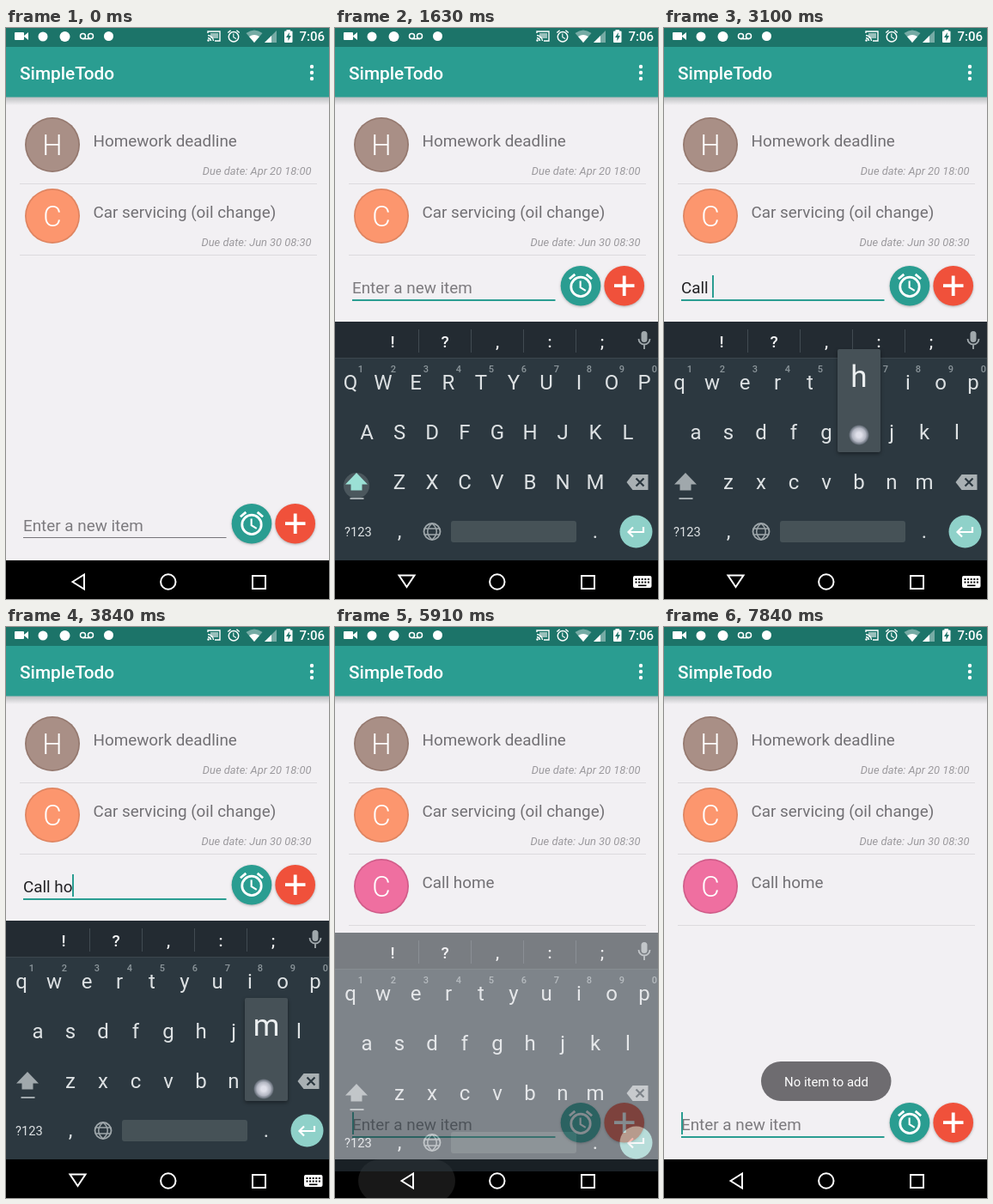
Write an HTML page with a canvas that moves like this. It is 376x665 px and loops after 8000 ms.

```html
<!DOCTYPE html>
<html lang="en">
<head>
<meta charset="utf-8">
<title>Todo list</title>
<style>
html, body { margin: 0; width: 100%; height: 100%; overflow: hidden; background: #f2f0f3 }
canvas { display: block }
</style>
</head>
<body>
<canvas id="stage" width="376" height="665"></canvas>
<script>
const LOOP = 8000, TICK = 147.8;
const TEAL = '#2a9d91', PAPER = '#f2f0f3', KEYS = '#2c3840', ICON = '#a0a8ac';
const screen = document.getElementById('stage').getContext('2d');
const layer = Object.assign(document.createElement('canvas'), { width: 376, height: 665 });
const board = layer.getContext('2d');
let g = screen;

// Timeline, in ticks
const ENTRY = 'Call home', TYPED = [13, 14, 15, 17, 20, 22, 24, 27, 28];
const BLINK = [5, 9, 13, 31, 34, 37, 40, 43, 47, 50, 53];
const FOCUS = 3, OPEN = 5, SHIFT = 11, UNSHIFT = 13, ADDED = 34, CLOSE = 39;
const BOARD_FADE = { 5: [.4, 20], 6: [.85, 6], 39: [.9, 4], 40: [.58, 14] };
const TOAST_FADE = { 48: .15, 49: .5, 50: .85 };
const POPUPS = { 12: 'C', 14: 'a', 15: 'l', 17: 'l', 21: 'h', 24: 'o', 26: 'm', 28: 'e' };
const TOUCHES = {
  2: [130, 578], 3: [130, 578], 10: [25, 534], 12: [151, 538], 14: [37, 474],
  15: [367, 461], 17: [350, 463], 19: [200, 597], 21: [227, 474], 24: [325, 417],
  26: [300, 538], 28: [97, 417], 33: [341, 300], 37: [83, 645], 38: [83, 645], 47: [345, 578]
};
const ROWS = [['qwertyuiop', 18, 421], ['asdfghjkl', 37, 479], ['zxcvbnm', 75, 537]];

function box(x, y, w, h, color, r = 0) {
  g.fillStyle = color;
  g.beginPath();
  g.roundRect(x, y, w, h, r);
  g.fill();
}
function disc(x, y, r, color) {
  g.fillStyle = color;
  g.beginPath();
  g.arc(x, y, r, 0, 7);
  g.fill();
}
function ring(x, y, r, color, width) {
  g.strokeStyle = color;
  g.lineWidth = width;
  g.beginPath();
  g.arc(x, y, r, 0, 7);
  g.stroke();
}
function shape(d, color) {
  g.fillStyle = color;
  g.fill(new Path2D(d));
}
function line(d, color, width) {
  g.strokeStyle = color;
  g.lineWidth = width;
  g.stroke(new Path2D(d));
}
function text(s, x, y, font, color, align = 'left') {
  g.font = font + 'px Roboto, sans-serif';
  g.fillStyle = color;
  g.textAlign = align;
  g.fillText(s, x, y);
}
function shadowed(blur, dy, alpha, draw) {
  g.save();
  g.shadowColor = `rgba(0,0,0,${alpha})`;
  g.shadowBlur = blur;
  g.shadowOffsetY = dy;
  draw();
  g.restore();
}
function alarm(x, y, scale) {
  g.save();
  g.translate(x, y);
  g.scale(scale, scale);
  ring(0, 1, 8, '#fff', 2);
  line('M-9.35-5.5L-4.75-9.35M9.35-5.5L4.75-9.35', '#fff', 2);
  line('M-.25-4V1.6L4.1 4.2', '#fff', 1.5);
  g.restore();
}

function statusBar() {
  box(0, 0, 376, 22, '#1c7469');
  box(10, 5, 11, 9, '#fff', 1);
  shape('M21 9L26 5V14L21 10Z', '#fff');
  disc(43, 10, 5.5, '#fff');
  disc(68.5, 10, 6, '#fff');
  ring(89.5, 9.5, 3, '#fff', 1.5);
  ring(98.5, 9.5, 3, '#fff', 1.5);
  line('M89 12.6H99', '#fff', 1.5);
  disc(119.5, 9.5, 5.5, '#fff');
  line('M235 6V4H249V15H243M235 8.5A7 7 0 0 1 241.5 15M235 11.5A4 4 0 0 1 238.5 15', '#fff', 1.4);
  box(238, 6, 9, 6, 'rgba(255,255,255,.55)');
  disc(235.5, 14.5, 1.2, '#fff');
  alarm(265, 9.5, .72);
  shape('M279.5 6Q289 -1 298.5 6L289 17Z', 'rgba(255,255,255,.4)');
  shape('M283 10Q289 6 295 10L289 17Z', '#fff');
  shape('M315 3V17H301Z', 'rgba(255,255,255,.4)');
  shape('M309 9V17H301Z', '#fff');
  box(324, 3.5, 9.5, 13.5, '#fff', 1);
  box(326.5, 2, 4.5, 2, '#fff');
  shape('M330 5L326 11H328.4V15L332 9H329.5Z', '#1c7469');
  text('7:06', 341.5, 15, '500 15', '#fff');
}

function toolbar() {
  const shade = g.createLinearGradient(0, 80, 0, 90);
  shade.addColorStop(0, '#b9bcbe');
  shade.addColorStop(1, PAPER);
  box(0, 80, 376, 10, shade);
  box(0, 22, 376, 58.6, TEAL);
  text('SimpleTodo', 16, 60, '500 20.8', '#fff');
  for (const y of [45, 52, 59]) disc(356, y, 2.2, '#fff');
}

function item(y, title, due, color, edge) {
  disc(54, y, 32, edge);
  disc(54, y, 30.3, color);
  text(title[0], 54, y + 12, '300 33', '#fff', 'center');
  text(title, 101.5, y + 2, '18.85', '#727074');
  if (due) text('Due date: ' + due, 355.5, y + 35, 'italic 12.9', '#9b999d', 'right');
  box(16, y + 45, 346, 1, '#dcdade');
}

function list(k, raised) {
  g.save();
  g.beginPath();
  g.rect(0, 90, 376, raised ? 187 : 460);
  g.clip();
  item(136, 'Homework deadline', 'Apr 20 18:00', '#a98f86', '#95796f');
  item(219, 'Car servicing (oil change)', 'Jun 30 08:30', '#fc966e', '#df8460');
  if (k >= ADDED) item(302, 'Call home', '', '#ef6fa0', '#d15d8a');
  g.restore();
}

function entry(k, raised) {
  const typed = k < ADDED ? ENTRY.slice(0, TYPED.filter(at => at <= k).length) : '';
  g.save();
  g.translate(0, raised ? -277 : 0);
  text(typed || 'Enter a new item', 20, 586, '18.85', typed ? '#222124' : '#7c7a7e');
  box(20, 593, 236.5, k < FOCUS ? 1 : 2, k < FOCUS ? '#77757a' : TEAL);
  if (BLINK.filter(at => at <= k).length % 2)
    box(Math.floor(20 + (typed && g.measureText(typed).width)), 565, 2, 26, TEAL);
  shadowed(3, 1, .28, () => {
    disc(286, 577.2, 23.3, TEAL);
    disc(336.7, 577.2, 23.3, '#f0513b');
  });
  alarm(286, 577, 1.4);
  line('M325 577.2H348.5M336.7 565.5V589', '#fff', 3.8);
  g.restore();
}

function navBar(k, raised) {
  box(0, 620, 376, 45, '#000');
  if (k >= 38 && k <= 40) box(27, 620, 113, 50, '#181818', 25);
  line(raised ? 'M74.5 637.5H92.5L83.5 651Z' : 'M77.5 645L91 636.5V653.5Z', '#fff', 2);
  ring(188.8, 645, 8.7, '#fff', 2);
  line('M287 638H302V653H287Z', '#fff', 2);
  if (!raised) return;
  box(347, 638, 21.5, 14, '#fff', 2);
  for (let i = 0; i < 5; i++) {
    box(349.5 + i * 3.6, 641, 2, 2, '#000');
    box(349.5 + i * 3.6, 644.5, 2, 2, '#000');
  }
  box(353, 648.5, 9.5, 1.6, '#000');
}

function popup(key) {
  const [row, left, base] = ROWS.find(r => r[0].includes(key.toLowerCase()));
  const x = left + 38 * row.indexOf(key.toLowerCase());
  shadowed(4, 2, .4, () => box(x - 25, base - 105, 50, 120, '#465157', 2));
  text(key, x, base - 61.5, '35', '#eceff0', 'center');
}

function keyboard(k) {
  const upper = k >= SHIFT && k < UNSHIFT;
  g.clearRect(0, 0, 376, 665);
  box(0, 342, 376, 278, KEYS);
  box(0, 342, 376, 42, '#232b32');
  box(0, 384, 376, 1, '#3c474e');
  [...'!?,:;'].forEach((c, i) => {
    text(c, 67 + 61 * i, 371.5, '500 19', '#f4f5f6', 'center');
    if (i) box(36 + 61 * i, 351, 1, 27, '#414b52');
  });
  box(356.5, 353, 7, 13, ICON, 3.5);
  line('M353.5 362A6.5 6.5 0 0 0 366.5 362M360 368.5V374', ICON, 1.8);

  for (const [row, left, base] of ROWS)
    [...row].forEach((c, i) => text(upper ? c.toUpperCase() : c, left + 38 * i, base, '24', '#dde1e3', 'center'));
  for (let i = 0; i < 10; i++) text((i + 1) % 10, 30 + 38 * i, 401, '500 11', '#8c969b', 'center');

  if (upper) disc(25, 533, 15, '#4b575d');
  shape('M25 518L38 531.5H31.5V538.5H18.5V531.5H12Z', upper ? '#9be0d5' : ICON);
  box(17.5, 547, 16, 2, ICON);
  shape('M339.5 529L346.5 520H364.5V538H346.5Z', '#a9b0b3');
  line('M350.5 524.5L359.5 533.5M359.5 524.5L350.5 533.5', KEYS, 2.2);

  text('?123', 11, 592, '14.7', '#dde1e3');
  text(',', 75, 594, '24', '#dde1e3', 'center');
  text('.', 303, 594, '24', '#dde1e3', 'center');
  ring(113, 586.5, 9.5, ICON, 1.8);
  line('M113 577C106 583 106 590 113 596C120 590 120 583 113 577M104.5 583H121.5M104.5 590H121.5', ICON, 1.5);
  box(135, 574, 146, 25, '#465257', 3);
  disc(350.5, 586.5, 19, '#8fd1c9');
  line('M359 581V587H342M347 581.5L341.5 587L347 592.5', '#fff', 2.2);
  if (POPUPS[k]) popup(POPUPS[k]);
}

function toast(alpha) {
  g.globalAlpha = alpha;
  box(113, 506, 151.5, 46, '#6e6c70', 23);
  text('No item to add', 189, 535, '14.9', '#fff', 'center');
  g.globalAlpha = 1;
}

function touch([x, y]) {
  const glow = g.createRadialGradient(x, y, 3, x, y, 12);
  glow.addColorStop(0, 'rgba(232,232,242,.95)');
  glow.addColorStop(.55, 'rgba(205,207,220,.8)');
  glow.addColorStop(.85, 'rgba(150,155,170,.55)');
  glow.addColorStop(1, 'rgba(130,135,150,0)');
  disc(x, y, 12, glow);
}

function draw(k) {
  const raised = k >= OPEN && k < CLOSE;
  g = screen;
  box(0, 0, 376, 665, PAPER);
  statusBar();
  toolbar();
  list(k, raised);
  entry(k, raised);
  navBar(k, raised);
  if (k >= OPEN && k <= 40) {
    const [alpha, drop] = BOARD_FADE[k] || [1, 0];
    g = board;
    keyboard(k);
    g = screen;
    g.globalAlpha = alpha;
    g.drawImage(layer, 0, drop);
    g.globalAlpha = 1;
  }
  if (k >= 48) toast(TOAST_FADE[k] || 1);
  if (TOUCHES[k]) touch(TOUCHES[k]);
}

function frame() {
  draw(Math.floor((performance.now() % LOOP + 10) / TICK));
  requestAnimationFrame(frame);
}
frame();
</script>
</body>
</html>
```
